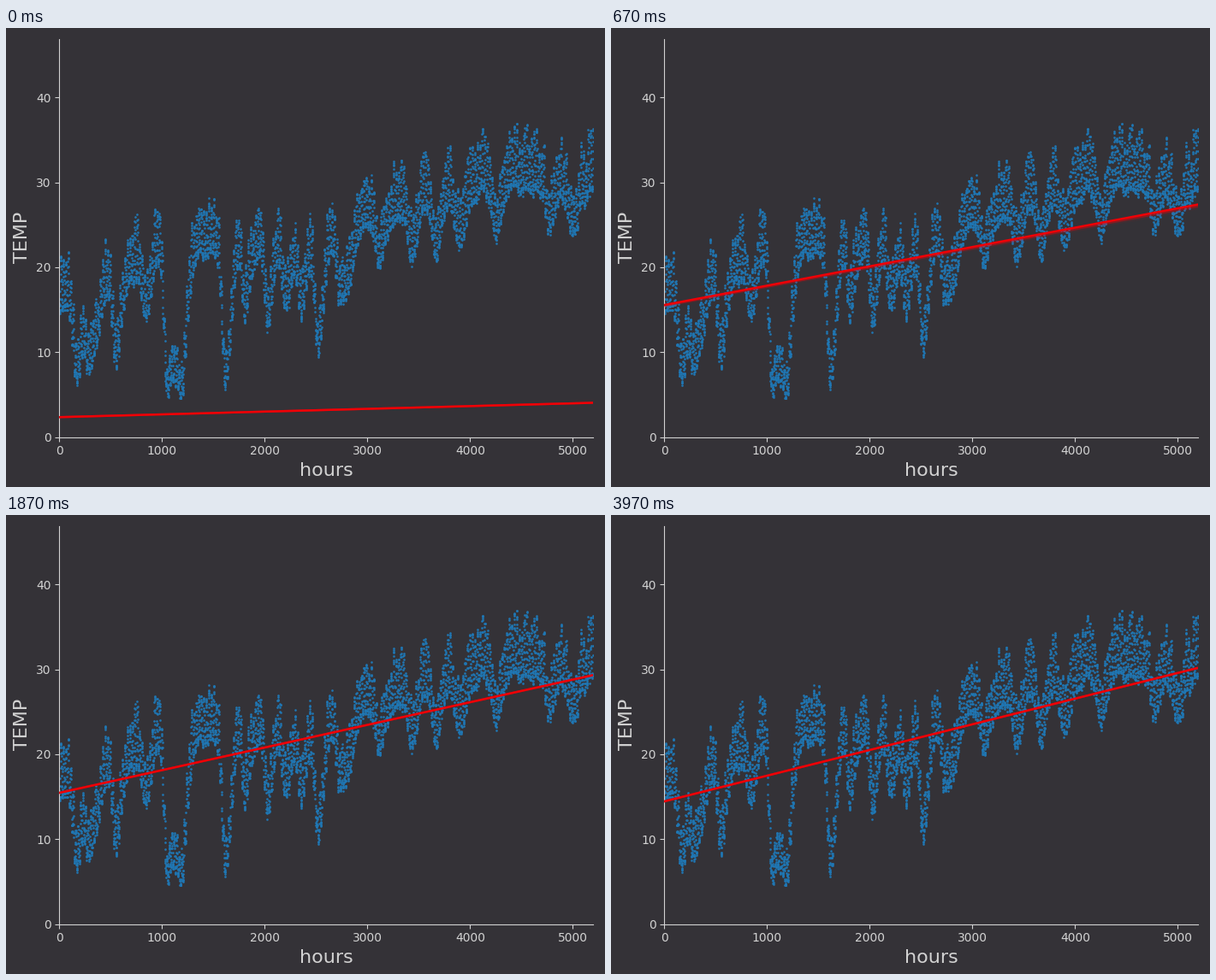
Write a matplotlib script that moves like this. It is 700 by 537 pixels and loops after 4010 ms.

```python
import numpy as np
import matplotlib.pyplot as plt
from matplotlib.animation import FuncAnimation

W, H, DPI = 700, 537, 100
FRAMES, LOOP_MS = 120, 4010
BG, INK, BLUE, RED = "#343237", "#d2d2d2", "#1f77b4", "#f00006"
X_MAX, Y_MAX = 5200, 46.85

# cold fronts: hour of the lowest point, drop in degrees
FRONTS = [(165, 10), (285, 10), (380, 4), (550, 11), (840, 6.5), (1050, 16),
          (1135, 10), (1195, 12), (1615, 17), (1805, 7.5), (2020, 9),
          (2200, 7.5), (2345, 8), (2515, 12), (2720, 6), (2800, 5),
          (3115, 5.5), (3430, 5.5), (3660, 6.5), (3885, 5), (4250, 6),
          (4760, 5.5), (4990, 5)]


def temperatures():
    rng = np.random.default_rng(7)
    hour = np.arange(X_MAX)
    warm = np.interp(hour, [0, 1000, 2600, 3100, 4450, 5200],
                     [18, 24.5, 24.8, 28, 32.5, 31.5])
    chill = np.zeros(X_MAX)
    for low, drop in FRONTS:
        # a front arrives faster than it leaves
        width = np.where(hour < low, 32, 52)
        chill += drop * np.exp(-((hour - low) / width) ** 2 / 2)
    wobble = np.interp(hour, hour[::40], rng.normal(0, 0.7, X_MAX // 40))
    swing = 3.1 - 0.075 * chill
    night = warm - chill + wobble - swing
    day = rng.uniform(0.75, 1.2, X_MAX // 24 + 1)[hour // 24]
    sun = (1 + np.sin(2 * np.pi * (hour - 9) / 24)) / 2
    temp = night + 2 * swing * day * sun**1.4 + rng.normal(0, 0.25, X_MAX)
    return hour, np.clip(temp, 4.6, 36.9).round(1)


def fit_ends(step):
    """Heights of the regression line at both ends: a fast and a slow decay."""
    left = 13.38 + 3.72 * 0.9895**step - 14.75 * 0.866**step
    right = 30.93 - 3.09 * 0.988**step - 23.8 * 0.8575**step
    return left, right


fig = plt.figure(figsize=(W / DPI, H / DPI), dpi=DPI, facecolor=BG)
ax = fig.add_axes([62.4 / W, 1 - 478.6 / H, 624 / W, 465.4 / H], facecolor=BG)
ax.set(xlim=(0, X_MAX), ylim=(0, Y_MAX),
       xticks=range(0, 5001, 1000), yticks=range(0, 41, 10))
ax.tick_params(color=INK, labelcolor=INK, labelsize=10)
ax.spines[["top", "right"]].set_visible(False)
ax.spines[["left", "bottom"]].set_color(INK)

label = dict(color=INK, fontsize=16, ha="center", va="baseline",
             rotation_mode="anchor")
fig.text(374.6 / W, 1 - 524.5 / H, "hours", **label)
fig.text(25 / W, 1 - 245 / H, "TEMP", rotation=90, **label)

ax.plot(*temperatures(), "o", ms=1.9, mew=0, color=BLUE)

# the current line and its two fading predecessors
lines = [ax.plot([], [], color=RED, lw=1.8, alpha=a, zorder=5 - i)[0]
         for i, a in enumerate((1, 0.45, 0.06))]


def update(step):
    for lag, line in enumerate(lines):
        line.set_data([0, X_MAX], fit_ends(max(step - lag, 0)))
    return lines


anim = FuncAnimation(fig, update, frames=FRAMES, interval=LOOP_MS / FRAMES,
                     repeat=True, repeat_delay=0)
plt.show()
```
